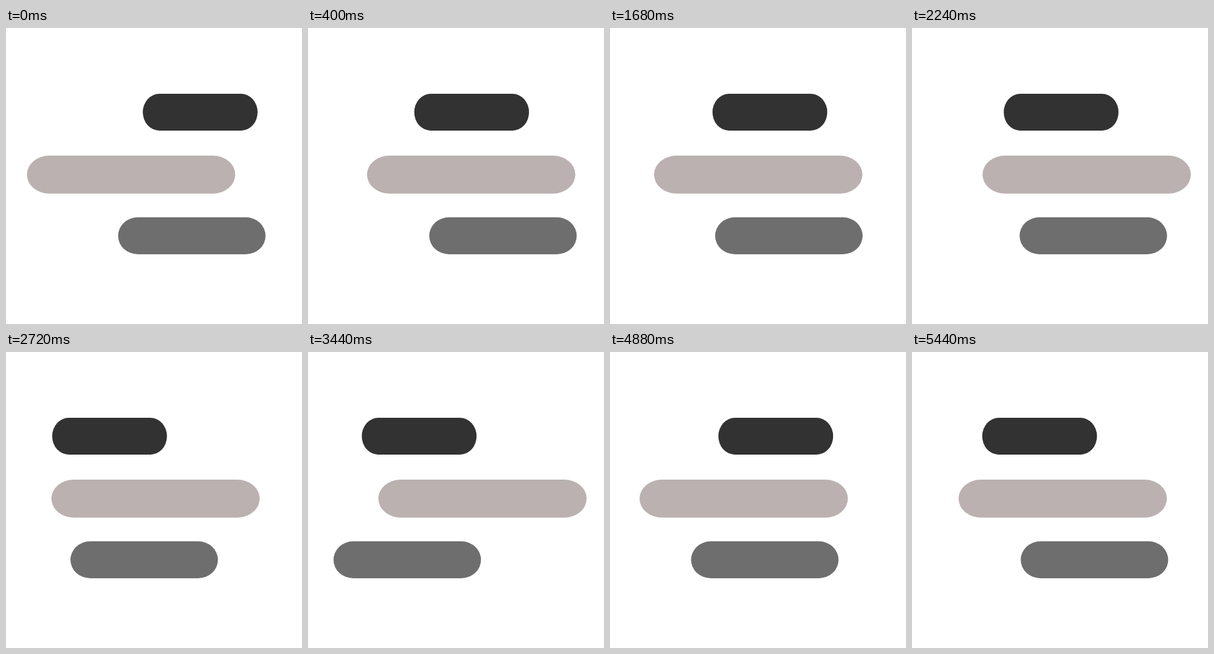
Recreate the animation shown at these times as an HTML page with a canvas. Size 450 by 450 pixels, loop 5.68 s.

```html
<!DOCTYPE html>
<html lang="en">
<head>
<meta charset="utf-8">
<title>Drifting bars</title>
<style>
  html, body { margin: 0; width: 100%; height: 100%; overflow: hidden; background: #fff; }
  canvas { display: block; width: 450px; height: 450px; }
</style>
</head>
<body>
<canvas id="stage" width="450" height="450"></canvas>
<script>
const ctx = document.getElementById("stage").getContext("2d");
const LOOP = 5680, STEP = 80, LAST = 68;

// Each bar swings between a few [step, left edge] turning points.
const bars = [
  { color: "#323232", y: 100, w: 174.5, h: 56, rx: 25, turns: [
    [0, 208], [13.7, 50], [23.1, 170], [37.25, 56], [56.75, 185], [69.5, 104]] },
  { color: "#bab1b0", y: 194, w: 316.7, h: 57.7, rx: 34, turns: [
    [0, 31.8], [6.8, 101], [16, 23], [26, 111], [38, 55], [44.9, 118], [56.9, 26], [66, 70.8]] },
  { color: "#6e6e6e", y: 287.8, w: 224.2, h: 56.2, rx: 30, turns: [
    [0, 170.4], [5.8, 185], [16, 149], [25.8, 170], [41.3, 38], [78.5, 194]] }
];

const easeInOut = u => (1 - Math.cos(Math.PI * u)) / 2;

function leftAt(turns, step) {
  const found = turns.findIndex(([time]) => time > step);
  if (found < 0) return turns[turns.length - 1][1];
  const [t0, x0] = turns[found - 1], [t1, x1] = turns[found];
  return x0 + (x1 - x0) * easeInOut((step - t0) / (t1 - t0));
}

function draw(now) {
  const step = Math.min(LAST, Math.floor((now % LOOP) / STEP));
  ctx.fillStyle = "#fff";
  ctx.fillRect(0, 0, 450, 450);
  for (const { color, y, w, h, rx, turns } of bars) {
    ctx.fillStyle = color;
    ctx.beginPath();
    ctx.roundRect(leftAt(turns, step), y, w, h, { x: rx, y: h / 2 });
    ctx.fill();
  }
}

const start = performance.now();
function tick() {
  draw(performance.now() - start);
  requestAnimationFrame(tick);
}
tick();
</script>
</body>
</html>
```
